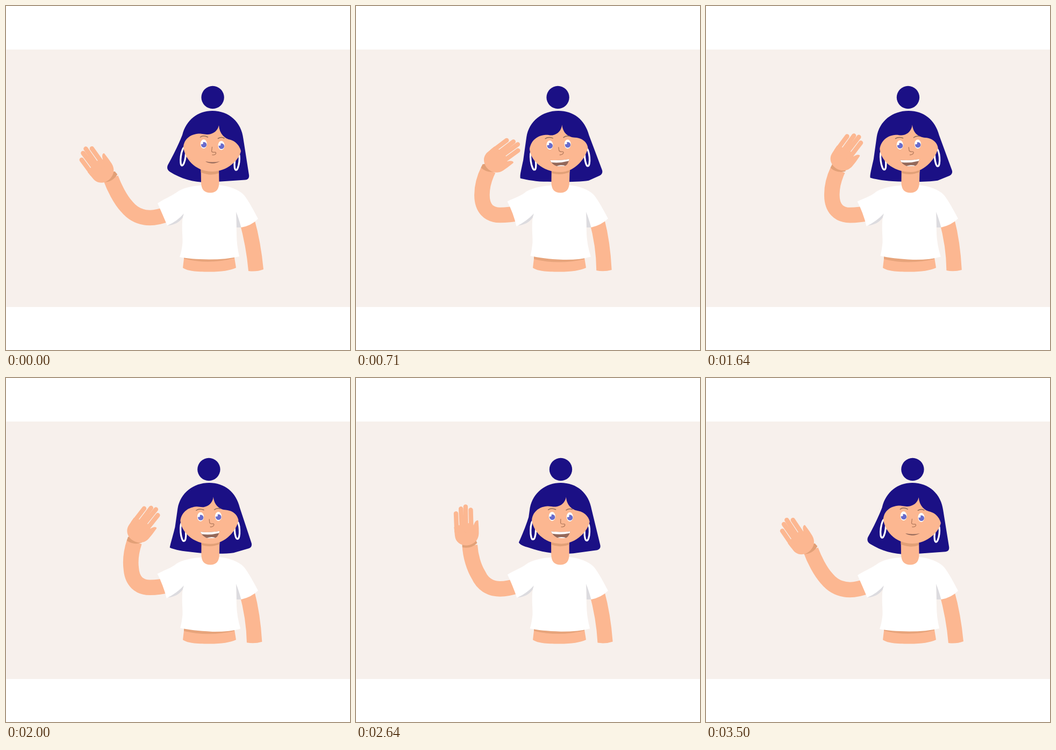
These frames come from a looping animation (640x640 px, 3570 ms). An HTML page:

```html
<!DOCTYPE html>
<html lang="en">
<head>
<meta charset="utf-8">
<title>Waving woman</title>
<style>
html, body { margin: 0; width: 100%; height: 100%; overflow: hidden; background: #fff; }
svg { display: block; width: 100vw; height: 100vh; }
</style>
</head>
<body>
<svg id="stage" viewBox="0 0 640 640">
  <defs><clipPath id="lips"><path id="lipsClip"/></clipPath></defs>
  <rect x=".5" y="81" width="640" height="479" fill="#f7f0ec"/>
  <g id="body"></g>
  <path id="arm" fill="none" stroke="#fcb791" stroke-width="28.6"/>
  <g id="sleeves"></g>
  <g id="wrist">
    <path id="cuff" fill="#e2a077" d="M-14.3 0Q0 7.500 14.3 0L13-7Q0-14-13-7Z"/>
    <g id="hand" fill="#fcb791" stroke="#fcb791" stroke-linecap="round">
      <path stroke="none" d="M-26-36L-26-20C-26-7-15 0-5 0C7 0 17-7 18.7-20L19.6-30L20-43C20-46 15-45 12-39L10.5-36L8-40L2-41L-24-38Z"/>
      <path fill="none" stroke-width="8.4" d="M-20-61L-21.8-28M-10-69L-12-28M-1-72L-4.3-28M8-65L5.5-28"/>
    </g>
  </g>
  <g id="head"></g>
  <g id="mouth">
    <path id="mouthShape" fill="#94695a"/>
    <g clip-path="url(#lips)" fill="#fff">
      <path id="teeth"/>
      <ellipse id="lower" cx="382.5" cy="298.500" rx="9"/>
    </g>
  </g>
</svg>
<script>
const LOOP = 3570, HALF = LOOP / 6;
const SKIN = '#fcb791', SHADE = '#e2a077', HAIR = '#1b1085', LINE = '#8d6b58', GREY = '#dcdbdf';
const $ = id => document.getElementById(id);

const lerp = (a, b, k) => a + (b - a) * k;
const clamp = x => Math.min(1, Math.max(0, x));
const smooth = x => x * x * (3 - 2 * x);

// Cubic ease (.5, 0, .5, 1)
function ease(x) {
  let lo = 0, hi = 1;
  for (let i = 0; i < 22; i++) {
    const t = (lo + hi) / 2;
    if (1.5 * t * (1 - t) + t * t * t < x) lo = t; else hi = t;
  }
  return smooth(lo);
}

// Blends two paths of the same structure; whole numbers stay whole, as arc flags must
const NUM = /-?\d+(\.\d+)?/g;
function mix(a, b, k) {
  const to = b.match(NUM);
  let i = 0;
  return a.replace(NUM, n => +lerp(+n, +to[i++], k).toFixed(2));
}

const parts = [];
function add(group, [out, inward = out], attrs) {
  const el = document.createElementNS('http://www.w3.org/2000/svg', 'path');
  for (const key in attrs) el.setAttribute(key, attrs[key]);
  $(group).append(el);
  parts.push({ el, out, inward });
}
const fill = color => ({ fill: color });
const line = (color, width) => ({ fill: 'none', stroke: color, 'stroke-width': width, 'stroke-linecap': 'round' });
const oval = (x, y, rx, ry, tilt = 0) => {
  const a = tilt * Math.PI / 180, dx = ry * Math.sin(a), dy = -ry * Math.cos(a);
  const arc = (ex, ey) => `A ${rx} ${ry} ${tilt} 1 1 ${ex.toFixed(2)} ${ey.toFixed(2)}`;
  return `M ${(x + dx).toFixed(2)} ${(y + dy).toFixed(2)} ${arc(x - dx, y - dy)} ${arc(x + dx, y + dy)} Z`;
};

// Torso and arms
add('body', ['M332 462 L329 487 C338 494 360 494.500 380 494.500 C400 494.500 418 492 428 487 L424 462 Z'], fill(SKIN));
add('body', [
  'M331 466 L331 470 Q378 482 425 469 L425 464 Z',
  'M331 464 L331 471 Q378 482 425 471 L425 466 Z'], fill('#e7a47b'));
add('body', [
  'M434 400 Q447 447 451 493 Q466 495 479 490 Q474 438 462 396 Z',
  'M434 400 Q447 447 447 492 Q461 495 475.500 491 Q473 438 462 396 Z'], fill(SKIN));
const ARM_OUT = 'C201 337 212.500 360 224.500 373 C236 387 250 394 268 394 C280 394 290 391 304 386';
const ARM_IN = 'C238 322 234.500 338 234.500 352 C234.500 376 247 389 268 389 C280 389 290 388 304 385';
add('sleeves', ['M300 408.500 Q320 407 329 393 L332 383 L315 390 Z'], fill(GREY));
add('sleeves', ['M428 380 L429 412 L437.500 412 L436 385 Z'], fill(GREY));
add('sleeves', [
  'M364 333.500 C345 335 327 339 317 347 C307 354 294 359 282 367 Q290.500 386 300 408.500 Q318 401 331 386 C325 402 329 425 328.500 440 Q327 456 323 467 Q342 471 378 471.500 Q410 471.500 434 466 Q429 444 429 424 L428 383 Q433 395 437.500 412 Q456 409 469 396 C459 377 451 362 443 352 C433 341 415 335 396 333 Z',
  'M364 333.500 C345 335 327 339 317 345 C307 354 294 357 281.500 363.500 Q292.500 384 298.500 410 Q318 400 331 386 C325 402 329 425 328.500 440 Q327 455 324.500 464.500 Q346 470 386 472 Q418 472.500 437 466.500 Q430 444 429 424 L428 383 Q433 395 437.500 412 Q456 408 469 395.500 C459 377 451 362 443 352 C433 341 415 335 396 333 Z'], fill('#fff'));

// Hair, neck and face
add('head', [oval(384.6, 170, 21.2, 21.2), oval(375, 170, 21.2, 21.2)], fill(HAIR));
add('head', [
  'M328 240 C335 212 357 195 384 195 C415 195 438 216 441.500 247 L452 314 C453 320 450 323 445 323.500 L385 327.500 C355 330 328 323 305 308.500 C300 305.500 299 301 301 296 C312 276 320 260 328 240 Z',
  'M316.500 244 C321 214 346 195 376 195 C404 195 425 211 433 240 L458 304 C460 309 458 313 454 315 C436 324.500 418 327.500 380 328 C352 328 330 327 313 323.500 C306 322 304.500 317 305.500 312 C310 290 313 265 316.500 244 Z'], fill(HAIR));
add('head', [
  'M362.500 298 L363 328 C363 341 369 347.500 380 347.500 C391 347.500 396.500 341 396.500 328 L396 298 Z',
  'M364 298 L363.500 328 C363.500 341 369 347.500 380.500 347.500 C391 347.500 397 341 397 328 L398 298 Z'], fill(SKIN));
add('head', [
  'M362.500 298 L362.500 309.500 Q380 317 396 311 L396 298 Z',
  'M364 298 L364 311 Q381 316 398 308.500 L398 298 Z'], fill(SHADE));
add('head', [oval(329.7, 280, 4.3, 17, 8), oval(329.7, 288, 4.3, 17.3, -9)], line('#fff', 3.3));
add('head', [oval(429.7, 289.5, 4.2, 15.8, 7), oval(430, 281, 4.2, 16.3, -6)], line('#fff', 3.3));
add('head', [
  'M330 262 C331 250 340 241 352 238.500 C362 236 366 239 376 239 C386 238 394 232 396 222 C397 238 407 247 418 249 C428 252 435 261 437 270 C434 286 412 308 384 308 C350 308 332 282 330 262 Z',
  'M322.500 266 C325 251 336 243 346 241 C356 238.500 357 241 365 240.500 C375 239 381.500 231 382.500 221 C384 237 395 244 406 244.500 C420 245 429 252 431 263 C428 281 408 309 380 309 C345 309 324 286 322.500 266 Z'], fill(SKIN));

// Each eye: white, iris and glint
function eye(x0, y0, x1, y1) {
  const layer = (dx, dy, rx, ry, color) =>
    add('head', [oval(x0 + dx, y0 + dy, rx, ry), oval(x1 + dx, y1 + dy, rx, ry)], fill(color));
  layer(0, 0, 6, 8.5, '#fff');
  layer(.3, 1.3, 5.2, 5.2, '#696bcb');
  layer(-3.2, -1.8, 2.2, 2.2, '#fff');
}
eye(367.8, 256.8, 360, 258.8);
eye(400.6, 259.5, 393.2, 256.8);
add('head', [
  'M361.500 244 Q367 239.500 375.500 244',
  'M351.500 247 Q357 243 365.500 246'], line(LINE, 1.5));
add('head', [
  'M394.500 246.500 Q400 243 406 246',
  'M385.500 244.500 Q390 240.500 396.500 242'], line(LINE, 1.5));
add('head', [
  'M383.500 262.500 L382.500 270 Q383 272.500 389 272 Q391 272.500 390.500 274.500 Q389 277.500 384 277',
  'M376.500 263 L377.500 269 Q379 271.500 384 271 Q386 271 385.500 273.500 Q384 277 379 277'], line('#b47b5d', 1.3));

const SHUT = 'M371 289 Q384 292 398 289 C394 291 391 292 388 292.500 Q384 293 381 292.500 C377 292 373 291 371 289 Z';
const OPEN = 'M364 284.500 Q382 287.500 400 285.500 C398 291.500 395 296.500 391 297.500 Q382 298.500 375 296.500 C369 293.500 366 289.500 364 284.500 Z';
const TEETH_SHUT = 'M371 289 Q384 292 398 289 L398 289 Q384 292 371 289 Z';
const TEETH_OPEN = 'M363 284 Q382 287 401 285 L398.500 289 Q382 292 366.500 289 Z';

// Hand angle at its turning points: [ms, degrees]
const turns = [[0, -39.5], [650, 50], [880, 50], [1240, -39.5], [1830, 50], [2380, -39.5], [2975, 50], [LOOP, -39.5]];
function handAngle(t) {
  const i = turns.findIndex(([at]) => at > t);
  const [t0, a0] = turns[i - 1], [t1, a1] = turns[i];
  return lerp(a0, a1, ease((t - t0) / (t1 - t0)));
}

function drawArm(t, bend) {
  // The forearm swings on an arc, so the wrist rises midway
  const lift = 20 * bend * (1 - bend);
  const x = lerp(195, 247, bend), y = lerp(320.5, 304.5, bend) - lift;
  $('arm').setAttribute('d', `M${x} ${y} ${mix(ARM_OUT, ARM_IN, bend)}`);
  $('wrist').setAttribute('transform', `translate(${x} ${y})`);
  $('cuff').setAttribute('transform', `rotate(${lerp(-31, 14, bend)})`);
  $('hand').setAttribute('transform', `rotate(${handAngle(t)})`);
}

function drawMouth(smile, sway) {
  const lips = mix(SHUT, OPEN, smile);
  $('mouthShape').setAttribute('d', lips);
  $('lipsClip').setAttribute('d', lips);
  $('teeth').setAttribute('d', mix(TEETH_SHUT, TEETH_OPEN, smile));
  $('lower').setAttribute('ry', 2.8 * smile);
  $('mouth').setAttribute('transform', `translate(${-2.8 * sway} ${.7 * sway}) rotate(${-5 * sway} 382 290)`);
}

function draw(t) {
  const step = Math.floor(t / HALF), e = ease(t / HALF - step);
  const sway = step % 2 ? 1 - e : e;
  const smile = ease(clamp((t - 150) / 400)) - ease(clamp((t - 3000) / 400));
  for (const p of parts) p.el.setAttribute('d', mix(p.out, p.inward, sway));
  drawArm(t, smooth(sway));
  drawMouth(smile, sway);
}

const start = performance.now();
function tick() {
  draw((performance.now() - start) % LOOP);
  requestAnimationFrame(tick);
}
tick();
</script>
</body>
</html>
```
